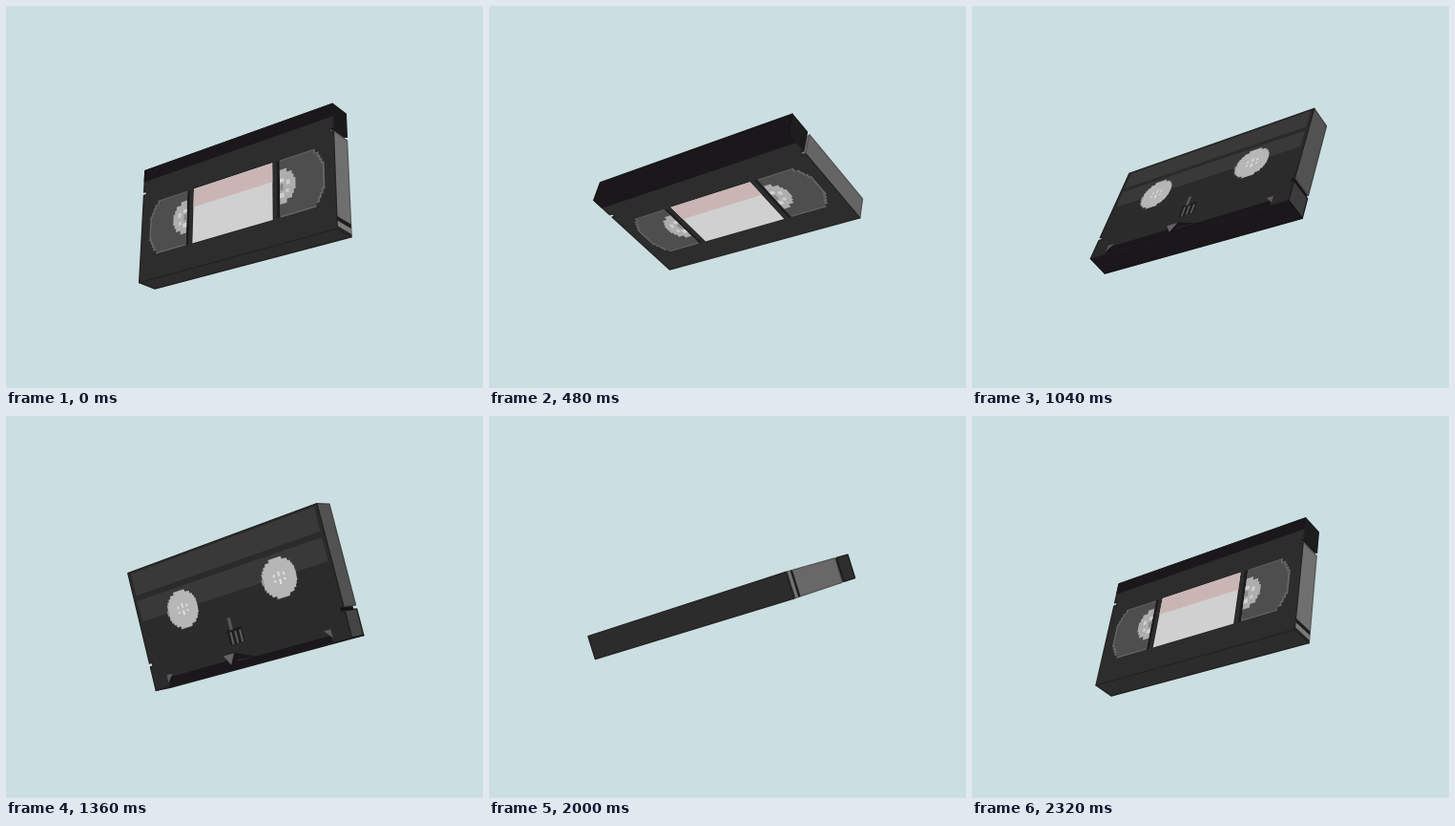
An HTML page that plays this animation: 500x400 px, repeating every 2400 ms.

```html
<!DOCTYPE html>
<html lang="en">
<head>
<meta charset="utf-8">
<title>Spinning video cassette</title>
<style>
html, body { margin: 0; width: 100%; height: 100%; overflow: hidden; background: #cbdee1; }
svg { display: block; width: 100%; height: 100%; }
</style>
</head>
<body>
<svg id="stage" viewBox="0 0 500 400"></svg>
<script>
const LOOP = 2400, STEP = 80, RAD = Math.PI / 180;
const stage = document.getElementById('stage');

// Camera and axis
const FOCAL = 1000;
const YAW = 33.5 * RAD, ROLL = 17.4 * RAD;
const CY = Math.cos(YAW), SY = Math.sin(YAW);
const CR = Math.cos(ROLL), SR = Math.sin(ROLL);
const OFF = [-5.2, -1.9];

// Cassette: x along the axis, y from flap to spine, z towards the label side
const X = 126, TOP = -62.3, BOT = 72, Z = 12.6;
const GAP0 = -35.5, GAP1 = -31.5, IN = 122;
const CELL = 4.2;

let h, n, out;

const gray = v => { const g = Math.round(v); return `rgb(${g},${g},${g})`; };
const dot = (a, b) => a[0] * b[0] + a[1] * b[1] + a[2] * b[2];

function project([x, y, z]) {
  const ex = CY * x + h[0] * y + n[0] * z + OFF[0];
  const ey = h[1] * y + n[1] * z + OFF[1];
  const ez = SY * x + h[2] * y + n[2] * z;
  const m = FOCAL / (FOCAL - ez);
  return [250 + m * (CR * ex + SR * ey), 200 + m * (CR * ey - SR * ex)];
}

function poly(points, fill, edge) {
  const d = points.map(p => project(p).map(v => v.toFixed(2)).join(' ')).join('L');
  out.push(`<path d="M${d}Z" fill="${fill}" stroke="${edge || 'none'}" stroke-width="1.3" stroke-linejoin="round"/>`);
}

const rect = (x0, y0, x1, y1) => [[x0, y0], [x1, y0], [x1, y1], [x0, y1]];
const mirror = (points, side) => points.map(([x, y]) => [x * side, y]);
const flat = (points, z, fill, edge) => poly(points.map(([x, y]) => [x, y, z]), fill, edge);
const endPiece = (x, y0, y1, fill, edge) =>
  poly([[x, y0, Z], [x, y0, -Z], [x, y1, -Z], [x, y1, Z]], fill, edge);
const long = (x0, x1, y, fill, edge) =>
  poly([[x0, y, -Z], [x1, y, -Z], [x1, y, Z], [x0, y, Z]], fill, edge);

// Disc built of square cells, cut off at lo and at top and bottom
function disc(cx, cy, r, cell, lo = -1e3, y0 = cy - r, y1 = cy + r) {
  const right = [], left = [];
  const rows = Math.round((y1 - y0) / cell), size = (y1 - y0) / rows;
  for (let i = 0; i < rows; i++) {
    const a = y0 + i * size, b = a + size, dy = (a + b) / 2 - cy;
    const w = Math.round(Math.sqrt(Math.max(0, r * r - dy * dy)) / cell * 2) * cell / 2;
    const l = Math.max(lo, cx - w);
    right.push([cx + w, a], [cx + w, b]);
    left.push([l, a], [l, b]);
  }
  return right.concat(left.reverse());
}

const shell = [
  [-X, TOP], [X, TOP], [X, GAP0], [IN, GAP0], [IN, GAP1], [X, GAP1],
  [X, BOT], [-X, BOT], [-X, GAP1], [-IN, GAP1], [-IN, GAP0], [-X, GAP0]
];
const EDGE = '#1b191b', FLAP = '#1b181b';

function drawEnd(angle, eyeY) {
  const tone = 0x60 + 0x0f * Math.cos(angle - 30 * RAD);
  const flap = 0x2e + 0x17 * Math.cos(angle - 180 * RAD);
  const gap = gray(Math.max(20, 0x38 + 0x40 * Math.cos(angle)));
  endPiece(IN, GAP0, GAP1, gap, gap);
  long(IN, X, GAP0, EDGE);
  long(IN, X, GAP1, gap);
  endPiece(X, TOP, GAP0, gray(flap), EDGE);
  endPiece(X, GAP1, BOT, gray(tone), gray(tone * 0.8));
  // The groove hides behind its rim when seen from the flap side
  if (eyeY > 0) {
    endPiece(X, 59, 63.5, '#1e1e1e');
    endPiece(X, 63.5, 69, gray(tone * 1.1));
    endPiece(X, 69, BOT, '#292929');
  }
}

function drawFront(angle) {
  const lit = 0.4 + 0.6 * Math.min(1, Math.cos(angle) * 1.6);
  const shade = v => gray(v * lit);
  flat(shell, Z, shade(0x2d), shade(0x24));
  flat(rect(-X, TOP, X, -49), Z, FLAP, FLAP);
  for (const side of [-1, 1]) {
    const part = (pts, fill) => flat(mirror(pts, side), Z, fill);
    part(rect(57.5, -19, 62, 44), shade(0x1d));
    part(disc(72, 12.5, 43, CELL, 61, -19, 44), shade(0x66));
    part(disc(70, 12.5, 43, CELL, 61, -18, 42.5), shade(0x4e));
    part(disc(61, 11, 19, CELL, 61), shade(0xad));
    part(rect(61, 2, 66, 6), shade(0xd2));
    part(rect(69, 5, 73, 10), shade(0xd0));
    part(rect(68, 15, 72, 19), shade(0xcb));
    part(rect(61, 18, 66, 23), shade(0xd2));
    part(rect(61, 8, 65, 15), shade(0x8a));
  }
  flat(rect(-53, -20, 53, 45), Z, shade(0x20));
  flat(rect(-52, -19, 52, 44), Z, '#d0d0d0');
  flat(rect(-52, -19, 52, 2.5), Z, '#cab5b5');
}

function drawBack() {
  const part = (pts, fill) => flat(pts, -Z, fill);
  flat(shell, -Z, '#2b2b2b', '#222022');
  part(rect(4 - X, 45, X - 4, BOT - 2), '#393939');
  part(rect(4 - X, 15, X - 4, 39), '#393939');
  part(rect(-105, TOP, -10, -52), FLAP);
  part(rect(-10, TOP, 105, -55), FLAP);
  part([[-26, -52], [-14, -45], [14, -55]], FLAP);
  for (const side of [-1, 1]) {
    part(mirror([[106, -49], [106, -58], [98, -49]], side), '#5a5a5a');
    const c = 63.5 * side + 0.7;
    part(disc(c - 1, 14.5, 20.5, 3), '#929292');
    part(disc(c, 14.5, 20, 3), '#b6b6b6');
    for (let i = -1; i <= 1; i++) {
      part(rect(c + i * 6 - 1.2, 8 + Math.abs(i) * 3, c + i * 6 + 1.2, 13), '#e2e2e2');
      part(rect(c + i * 6 - 1.2, 16, c + i * 6 + 1.2, 21 - Math.abs(i) * 2), '#dadada');
    }
  }
  // Tape guide and light hole
  part([[-26, -46], [-12, -46], [-19, -57]], '#636363');
  part(rect(-14, -37, 5, -21), '#1f1d1f');
  part(rect(-10, -22, -6, -9), '#555555');
  for (let i = 0; i < 3; i++) part(rect(-11 + i * 6, -37, -8.5 + i * 6, -24), '#5c5c5c');
}

function draw(step) {
  const angle = (30 - 12 * step) * RAD;
  const c = Math.cos(angle), s = Math.sin(angle);
  h = [-SY * s, c, CY * s];
  n = [-SY * c, -s, CY * c];
  out = ['<rect width="500" height="400" fill="#cbdee1"/>'];
  const eye = [-OFF[0], -OFF[1], FOCAL];
  const ey = dot(eye, h), ez = dot(eye, n);

  drawEnd(angle, ey);
  if (ey < TOP) long(-X, X, TOP, FLAP, '#151315');
  if (ey > BOT) long(-X, X, BOT, '#2c2c2c', '#222022');
  if (ez > Z) drawFront(angle);
  if (ez < -Z) drawBack();
  stage.innerHTML = out.join('');
}

const start = performance.now();
let shown = -1;
function tick() {
  const step = Math.floor(((performance.now() - start) % LOOP) / STEP);
  if (step !== shown) draw(shown = step);
  requestAnimationFrame(tick);
}
tick();
</script>
</body>
</html>
```
